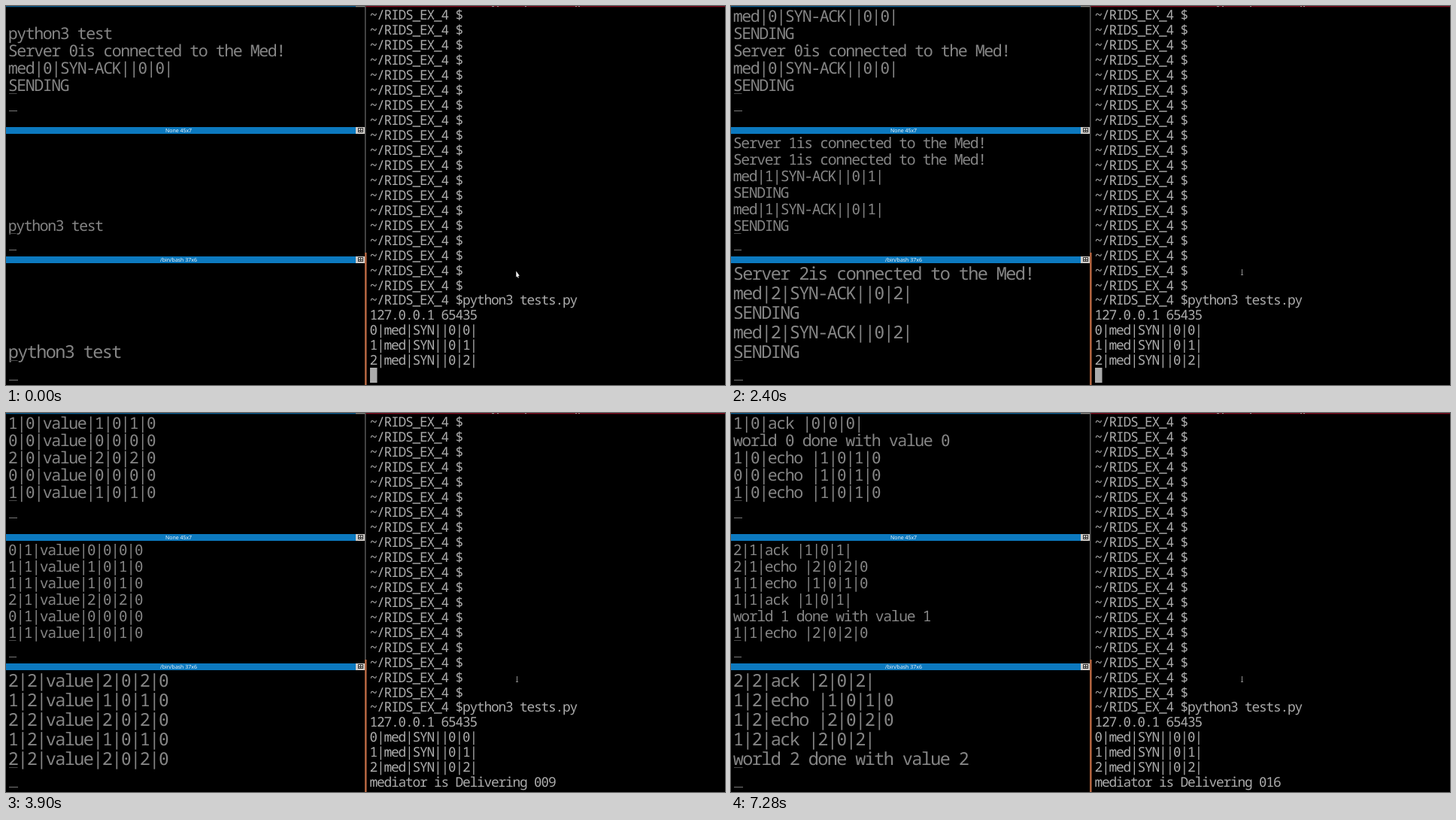
An HTML page with a canvas that plays this animation: 956x504 px, repeating every 8000 ms.

```html
<!DOCTYPE html>
<html lang="en">
<head>
<meta charset="utf-8">
<title>Terminal panes</title>
<style>
html, body { margin: 0; width: 100%; height: 100%; overflow: hidden; background: #000; }
canvas { display: block; width: 956px; height: 504px; }
</style>
</head>
<body>
<canvas id="stage" width="956" height="504"></canvas>
<script>
const ctx = document.getElementById('stage').getContext('2d');
const LOOP = 8000;
const MONO = '"Noto Sans Mono", "DejaVu Sans Mono", monospace';
const DOTTED = '"DejaVu Sans Mono", monospace';
const SANS = '"Open Sans", "Noto Sans", sans-serif';
const DIM = '#858585', LIT = '#acacac', BLUE = '#0c79bf';

// x, baseline of the first row, cell width, row height
const TOP = { x: 3.5, y: 21, adv: 11.5, row: 23, color: DIM };
const MID = { x: 3.5, y: 189, adv: 10.5, row: 22, color: DIM };
const LOW = { x: 3.5, y: 364, adv: 12.5, row: 26, color: DIM };
const MAIN = { x: 484, y: 18, adv: 9.5, row: 19.973, color: LIT };

const hello = n => `Server ${n}is connected to the Med!`;
const synAck = n => `med|${n}|SYN-ACK||0|${n}|`;
const value = (from, to) => `${from}|${to}|value|${from}|0|${from}|0`;
const echo = (from, to, v) => `${from}|${to}|echo |${v}|0|${v}|0`;
const ack = (from, to) => `${from}|${to}|ack |${to}|0|${to}|`;
const done = n => `world ${n} done with value ${n}`;
const values = (to, senders) => [...senders].map(s => value(+s, to));
const START = 'python3 test', SEND = 'SENDING';

const scenes = [
  {
    at: 0, status: '',
    top: ['', START, hello(0), synAck(0), SEND],
    mid: ['', '', '', '', '', START],
    low: ['', '', '', '', START]
  },
  {
    at: 1240, status: '',
    top: [synAck(0), SEND, hello(0), synAck(0), SEND],
    mid: [hello(1), hello(1), synAck(1), SEND, synAck(1), SEND],
    low: [hello(2), synAck(2), SEND, synAck(2), SEND]
  },
  {
    at: 2820, status: 'mediator is Delivering 009',
    top: values(0, '10201'),
    mid: values(1, '011201'),
    low: values(2, '21212')
  },
  {
    at: 5460, status: 'mediator is Delivering 009',
    top: [...values(0, '0201'), echo(2, 0, 0)],
    mid: [...values(1, '11201'), echo(0, 1, 0)],
    low: [...values(2, '1212'), echo(2, 2, 0)]
  },
  {
    at: 6040, status: 'mediator is Delivering 016',
    top: [ack(1, 0), done(0), echo(1, 0, 1), echo(0, 0, 1), echo(1, 0, 1)],
    mid: [ack(2, 1), echo(2, 1, 2), echo(1, 1, 1), ack(1, 1), done(1), echo(1, 1, 2)],
    low: [ack(2, 2), echo(1, 2, 1), echo(1, 2, 2), ack(1, 2), done(2)]
  }
];

const blinkOn = [[0, 1240], [2400, 3900], [6040, 7280]];
const POINTER_SWAP = 820;

const shell = [
  ...Array(19).fill('~/RIDS_EX_4 $'),
  '~/RIDS_EX_4 $python3 tests.py',
  '127.0.0.1 65435',
  ...[0, 1, 2].map(n => `${n}|med|SYN||0|${n}|`)
];

function rect(x, y, w, h, color) {
  ctx.fillStyle = color;
  ctx.fillRect(x, y, w, h);
}

// One glyph per cell, as a terminal lays it out; zeros carry a dot
function write(pane, lines, firstRow = 0) {
  const body = `${pane.adv * 1.88}px ${MONO}`;
  const zero = `${pane.adv * 1.82}px ${DOTTED}`;
  ctx.textAlign = 'center';
  ctx.textBaseline = 'alphabetic';
  ctx.fillStyle = pane.color;
  lines.forEach((line, r) => {
    const y = Math.round(pane.y + (firstRow + r) * pane.row);
    [...line].forEach((ch, i) => {
      if (ch === ' ') return;
      ctx.font = ch === '0' ? zero : body;
      ctx.fillText(ch, pane.x + (i + 0.5) * pane.adv, y);
    });
  });
}

function leftPane(pane, lines) {
  write(pane, lines);
  const y = pane.y + (lines.length - 1) * pane.row + 3;
  rect(4, y, pane.adv - 1, 1, '#484848');
  rect(4, y + pane.row, pane.adv - 0.5, 1, '#787878');
}

function titleBar(y, label) {
  rect(0, y, 465, 9, BLUE);
  rect(465, y, 12, 9, '#cfccc8');
  ctx.fillStyle = '#fff';
  ctx.font = `7px ${SANS}`;
  ctx.textAlign = 'center';
  ctx.textBaseline = 'alphabetic';
  ctx.fillText(label, 229.5, y + 7);
  ctx.strokeStyle = '#333';
  ctx.lineWidth = 1;
  ctx.strokeRect(468.5, y + 1.5, 6, 5);
  rect(471, y + 1, 1, 6, '#333');
  rect(468, y + 4, 7, 1, '#333');
}

function frameLines() {
  rect(0, 0, 465, 1.3, '#0b5c90');
  rect(465, 0, 12, 1.3, '#8a8886');
  rect(478, 0, 478, 1.3, '#7d0a1e');
  // lower edge of the clipped window title
  [[646, 3], [653, 2], [690, 2], [757, 2], [761, 2]].forEach(([x, w]) => rect(x, 0, w, 1, '#b58d94'));
  rect(477, 0, 1.5, 328, '#565656');
  rect(477, 328, 2.6, 176, '#b0633f');
}

function arrow() {
  ctx.beginPath();
  [[678.3, 352.5], [678.3, 360.6], [679.8, 359.4], [680.8, 361.8], [681.8, 361.3],
   [680.9, 359], [682.8, 358.7]].forEach(([x, y]) => ctx.lineTo(x, y));
  ctx.closePath();
  ctx.fillStyle = '#f4f4f4';
  ctx.fill();
}

function beam() {
  rect(679, 350, 1, 8, '#909090');
  rect(678, 357, 3, 1, '#858585');
}

function draw(t) {
  const scene = scenes.filter(s => s.at <= t).pop();
  rect(0, 0, 956, 504, '#000');
  leftPane(TOP, scene.top);
  leftPane(MID, scene.mid);
  leftPane(LOW, scene.low);
  titleBar(161, 'None 45x7');
  titleBar(333, '/bin/bash 37x6');

  write(MAIN, shell);
  write(MAIN, [scene.status], 24);
  if (blinkOn.some(([a, b]) => t >= a && t < b)) {
    rect(484, 481, 9.5, 20, LIT);
    write({ ...MAIN, color: '#000' }, [scene.status.slice(0, 1)], 24);
  }
  frameLines();
  t < POINTER_SWAP ? arrow() : beam();
}

ctx.textRendering = 'geometricPrecision';
const began = performance.now();
function tick() {
  draw((performance.now() - began) % LOOP);
  requestAnimationFrame(tick);
}
tick();
</script>
</body>
</html>
```
